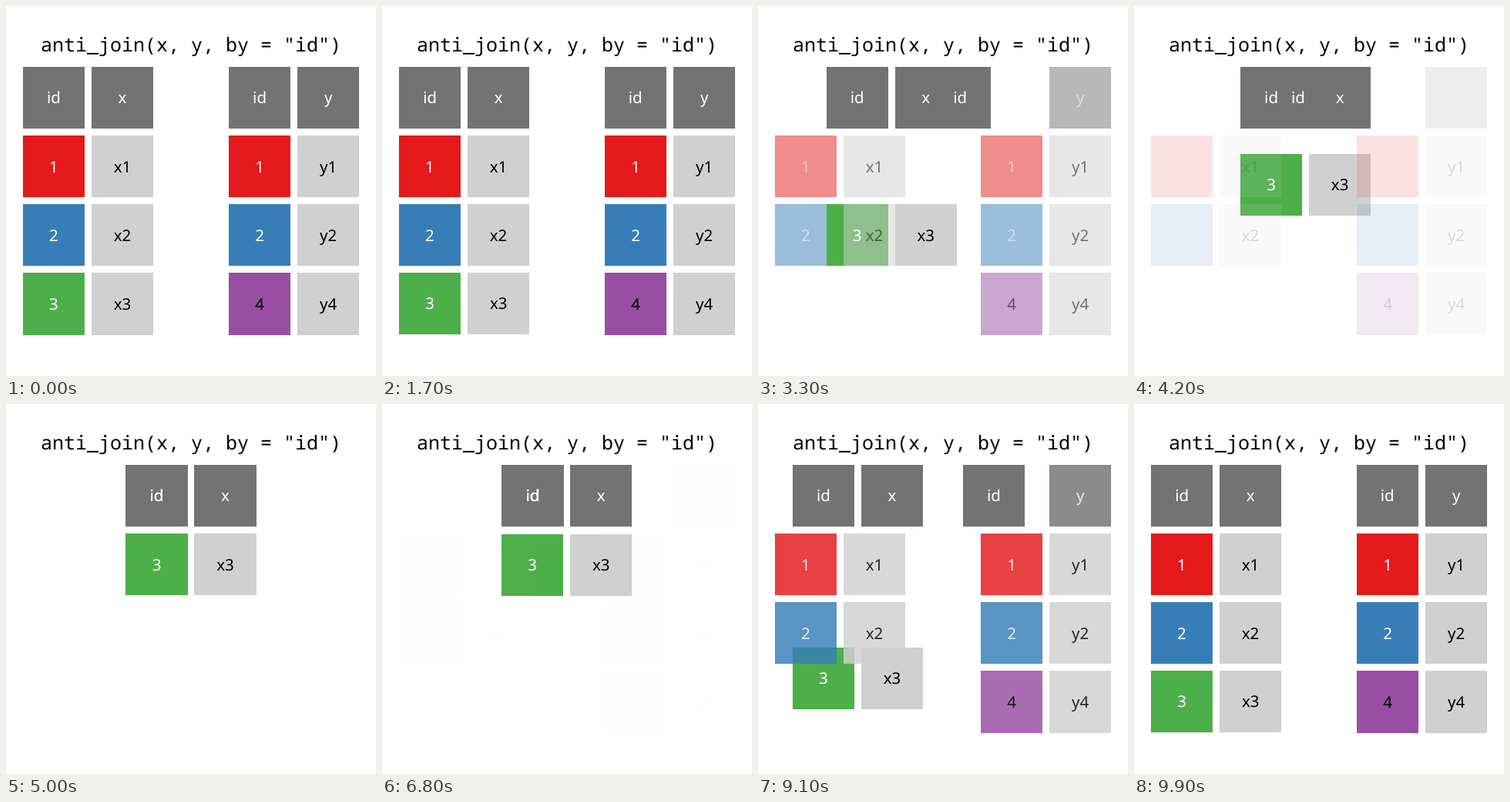
Animation, 480 px wide and 480 px high, one loop 10000 ms. Source, as an HTML page:

```html
<!DOCTYPE html>
<html lang="en">
<head>
<meta charset="utf-8">
<title>anti_join</title>
<style>
  html, body { margin: 0; width: 100%; height: 100%; overflow: hidden; background: #fff; }
  svg { display: block; width: 100%; height: 100%; }
  text { text-anchor: middle; text-rendering: geometricPrecision; }
  .title { font: 25px "Noto Sans Mono", "DejaVu Sans Mono", monospace; white-space: pre; }
  .label { font: 20.5px "Noto Sans", "Open Sans", sans-serif; }
</style>
</head>
<body>
<svg viewBox="0 0 480 480">
  <text class="title" x="240" y="59">anti_join(x, y, by = "id")</text>
  <g id="tiles"></g>
  <g id="labels"></g>
</svg>
<script>
const LOOP = 10000, STEP = 100;
const LEFT = 21.85, TOP = 79.22, PITCH = 89.05, SIZE = 80.15;
const HEAD = '#737373', RED = '#e41a1c', BLUE = '#377eb8',
      GREEN = '#4daf4a', PURPLE = '#984ea3', PALE = '#d0d0d0';

const tiles = document.getElementById('tiles');
const labels = document.getElementById('labels');

function add(parent, tag, attrs) {
  const el = document.createElementNS('http://www.w3.org/2000/svg', tag);
  for (const k in attrs) el.setAttribute(k, attrs[k]);
  return parent.appendChild(el);
}

// Cells with an end position [column, row] move; the others fade.
function cell(col, row, text, fill, ink, end) {
  const rect = add(tiles, 'rect', { fill });
  const label = add(labels, 'text', { class: 'label', fill: ink });
  label.textContent = text;
  return { col, row, end, rect, label };
}

const W = '#fff', K = '#000';
const cells = [
  cell(0, 0, 'id', HEAD, W, [1.5, 0]),
  cell(0, 1, '1', RED, W),
  cell(0, 2, '2', BLUE, W),
  cell(0, 3, '3', GREEN, W, [1.5, 1]),
  cell(1, 0, 'x', HEAD, W, [2.5, 0]),
  cell(1, 1, 'x1', PALE, K),
  cell(1, 2, 'x2', PALE, K),
  cell(1, 3, 'x3', PALE, K, [2.5, 1]),
  cell(3, 0, 'id', HEAD, W, [1.5, 0]),
  cell(3, 1, '1', RED, W),
  cell(3, 2, '2', BLUE, W),
  cell(3, 3, '4', PURPLE, K),
  cell(4, 0, 'y', HEAD, W),
  cell(4, 1, 'y1', PALE, K),
  cell(4, 2, 'y2', PALE, K),
  cell(4, 3, 'y4', PALE, K)
];

const sine = (t, from, to) => {
  const u = Math.min(1, Math.max(0, (t - from) / (to - from)));
  return (1 - Math.cos(Math.PI * u)) / 2;
};

// On the way back the cells that fade in lie above the moving ones.
const orders = [cells, [...cells.filter(c => c.end), ...cells.filter(c => !c.end)]];
let order = cells;

function stack(next) {
  if (next === order) return;
  order = next;
  for (const c of order) {
    tiles.appendChild(c.rect);
    labels.appendChild(c.label);
  }
}

function place(c, p) {
  const [col, row] = c.end || [c.col, c.row];
  const x = LEFT + PITCH * (c.col + (col - c.col) * p);
  const y = TOP + PITCH * (c.row + (row - c.row) * p);
  const x0 = Math.round(x), y0 = Math.round(y);
  c.rect.setAttribute('x', x0);
  c.rect.setAttribute('y', y0);
  c.rect.setAttribute('width', Math.round(x + SIZE) - x0);
  c.rect.setAttribute('height', Math.round(y + SIZE) - y0);
  c.label.setAttribute('x', x + SIZE / 2);
  c.label.setAttribute('y', y + SIZE / 2 + 7.2);
  if (!c.end) {
    c.rect.setAttribute('opacity', 1 - p);
    c.label.setAttribute('opacity', 1 - p);
  }
}

let last = -1;
function draw(now) {
  const t = Math.floor((now % LOOP) / STEP) * STEP;
  if (t !== last) {
    last = t;
    const p = sine(t, 1600, 5000) - sine(t, 6700, LOOP);
    stack(orders[t > 6000 ? 1 : 0]);
    for (const c of cells) place(c, p);
  }
}

const start = performance.now();
function tick() {
  draw(performance.now() - start);
  requestAnimationFrame(tick);
}
tick();
</script>
</body>
</html>
```
